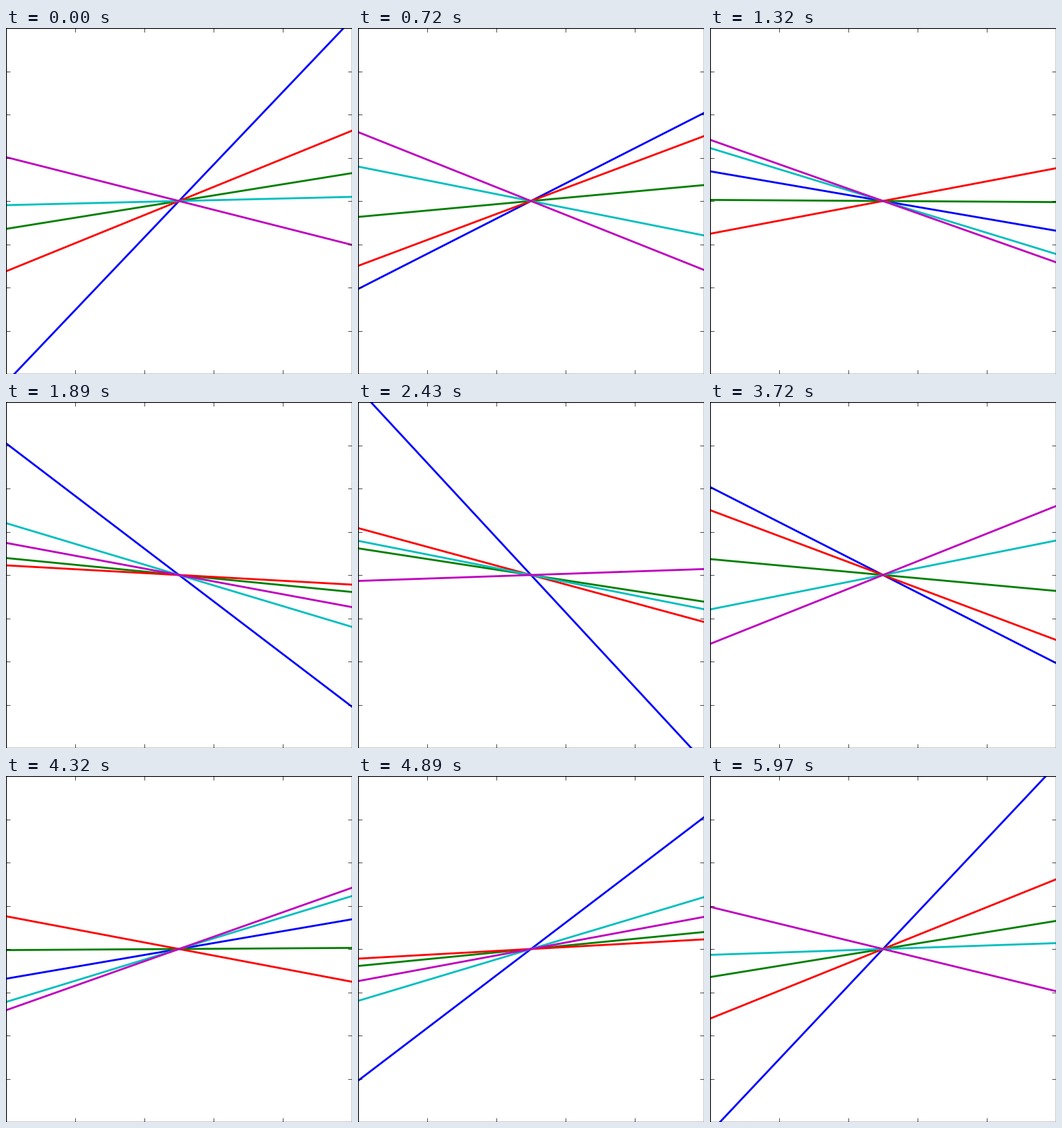
A matplotlib script that plays this animation: 500 by 500 pixels, repeating every 6000 ms.

```python
import numpy as np
import matplotlib.pyplot as plt
from matplotlib.animation import FuncAnimation

plt.style.use("classic")

FRAMES = 200
HALF = 250

# colour, cosine and sine parts of the height at the right edge
LINES = [
    ("b", 262.6, -93.8),
    ("g", 40.3, -9.3),
    ("r", 101.6, 28.8),
    ("c", 6.0, -79.1),
    ("m", -63.4, -78.0),
]

fig = plt.figure(figsize=(5, 5), dpi=100, facecolor="w")
ax = fig.add_axes([0, 0, 1, 1])
ax.set_xlim(-HALF, HALF)
ax.set_ylim(-HALF, HALF)
ax.set_xticks(np.linspace(-HALF, HALF, 6))
ax.set_yticks(np.linspace(-HALF, HALF, 9))
ax.tick_params(labelbottom=False, labelleft=False)

ends = np.array([-HALF, HALF])
artists = [ax.plot(ends, [0, 0], color=color, lw=2)[0] for color, _, _ in LINES]


def update(i):
    angle = 2 * np.pi * i / FRAMES
    for line, (_, a, b) in zip(artists, LINES):
        rise = a * np.cos(angle) + b * np.sin(angle)
        line.set_ydata([-rise, rise])
    return artists


anim = FuncAnimation(fig, update, frames=FRAMES, interval=30, repeat=True)
plt.show()
```
